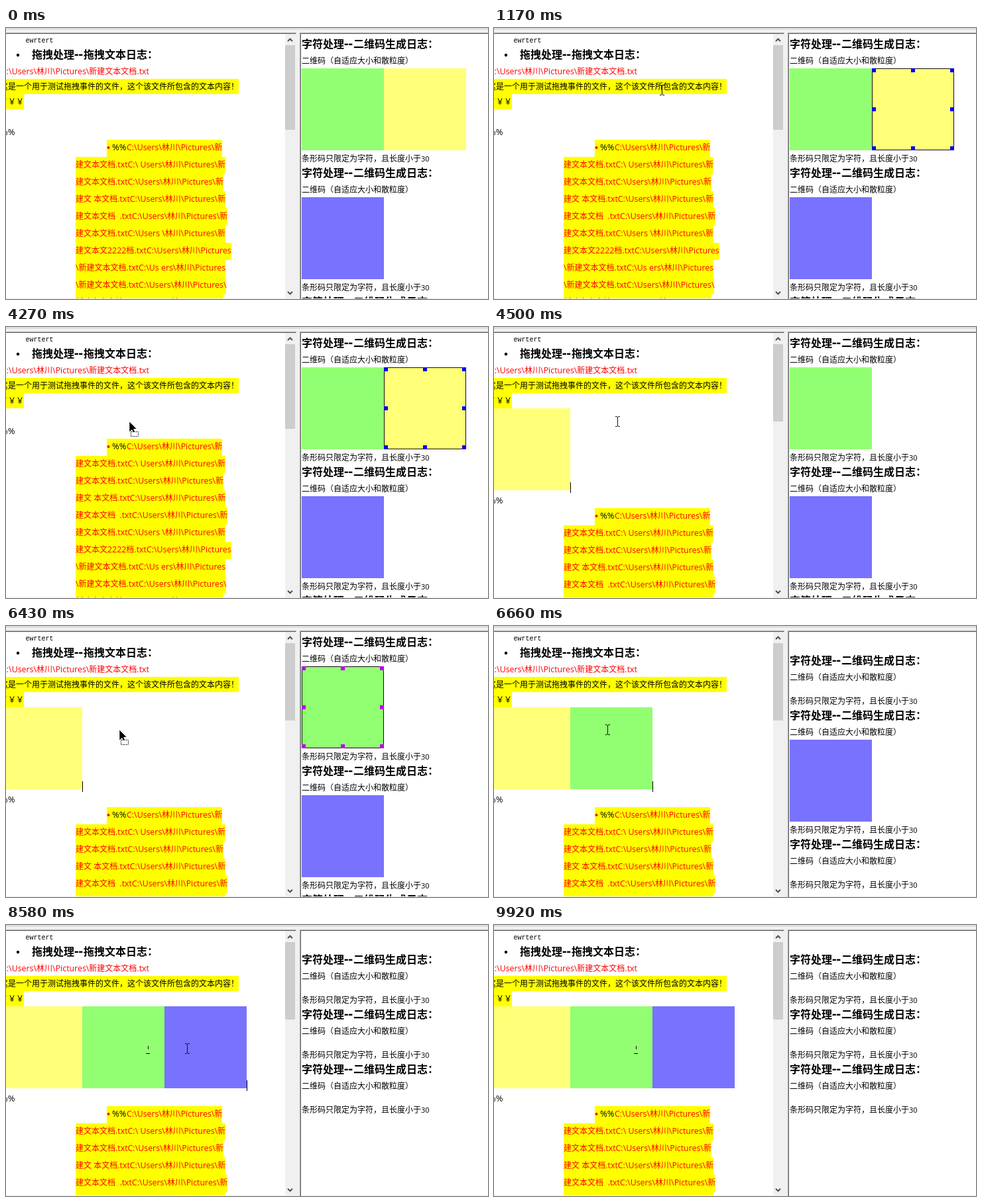
Animation, 727 px wide and 410 px high, one loop 9990 ms. Source, as an HTML page:

```html
<!DOCTYPE html>
<html lang="zh-CN">
<head>
<meta charset="utf-8">
<title>Drag and drop log</title>
<style>
html, body { margin: 0; width: 100%; height: 100%; overflow: hidden; background: #f0f0f0; }
svg { display: block; width: 727px; height: 410px; }
text { font-family: "Open Sans", "Noto Sans CJK SC", "Noto Sans CJK", sans-serif; white-space: pre; }
.mono { font: 10px "Liberation Mono", monospace; }
.crisp { shape-rendering: crispEdges; }
</style>
</head>
<body>
<svg viewBox="0 0 727 410">
  <defs>
    <clipPath id="clipL"><rect y="9" width="421" height="400"/></clipPath>
    <clipPath id="clipR"><rect x="445" y="9" width="282" height="400"/></clipPath>
  </defs>
  <g class="crisp">
    <rect width="727" height="410" fill="#f0f0f0"/>
    <rect y="1" width="727" height="1" fill="#c8c8c8"/>
    <rect y="9" width="437" height="400" fill="#fff"/>
    <rect y="7" width="438" height="1" fill="#a0a0a0"/>
    <rect y="8" width="437" height="1" fill="#696969"/>
    <rect x="445" y="9" width="282" height="400" fill="#fff"/>
    <path d="M443 410V7H727V8H444V410z" fill="#a0a0a0"/>
    <path d="M444 410V8H727V9H445V410z" fill="#696969"/>
    <rect x="421" y="9" width="16" height="400" fill="#f0f0f0"/>
    <rect id="thumb" x="421" y="26" width="15" height="128" fill="#cdcdcd"/>
  </g>
  <path d="M425 20l3.5-3.5l3.5 3.5M425 399l3.5 3.5l3.5-3.5" fill="none" stroke="#505050" stroke-width="2"/>
  <g id="left" clip-path="url(#clipL)"></g>
  <g id="right" clip-path="url(#clipR)"></g>
  <rect id="caret" class="crisp" y="235" width="1" height="16"/>
  <path id="trace" d="M214.5 183V188M211 194.5H217" stroke="#111"/>
  <path id="beam" d="M-3 -7.5H-1L.5 -6.5L2 -7.5H4M.5 -6.5V6.5M-3 7.5H-1L.5 6.5L2 7.5H4" fill="none" stroke="#111"/>
  <g id="drag">
    <path d="M0 0V16L4 12.5L6.5 18L9 17L6.5 11.5L11 11z" stroke="#fff" stroke-width=".6"/>
    <rect x="2.5" y="15.5" width="11" height="7" fill="#fff" stroke="#111" stroke-dasharray="1.5 1"/>
  </g>
</svg>
<script>
const LOOP = 9990, STEP = 77.5, SIZE = 124, LINE = 26;
const RED = '#f00', YELLOW = '#ff0';
const $ = id => document.getElementById(id);
const left = $('left'), right = $('right');

// Each picture is selected, dragged and dropped once (times in ms).
const pics = [
  { block: 0, col: 1, fill: '#ffff78', mark: '#0000e8', pick: 870, drag: 3650, drop: 4500 },
  { block: 0, col: 0, fill: '#92ff72', mark: '#b800e8', pick: 5500, drag: 6040, drop: 6660 },
  { block: 1, col: 0, fill: '#7872ff', mark: '#e8e800', pick: 7740, drag: 8120, drop: 8580 }
];
const [first, second] = pics;

// Pointer strokes: each curves from where the last one ended.
const strokes = [
  { at: 70, steps: 8, via: [645, 270], to: [624, 156] },
  { at: 790, steps: 18, via: [140, 40], to: [112, 140] },
  { at: 2400, steps: 13, via: [920, 148], to: [633, 129] },
  { at: 3650, steps: 9, via: [400, 180], to: [186, 143] },
  { at: 4810, steps: 12, via: [790, 650], to: [486, 143] },
  { at: 6040, steps: 6, via: [330, 175], to: [171, 157] },
  { at: 6810, steps: 13, via: [470, 375], to: [537, 250] },
  { at: 8120, steps: 4, via: [400, 205], to: [273, 187] },
  { at: 8750, steps: 6, via: [400, 290], to: [530, 410] }
];
strokes.forEach((s, i) => s.from = i ? strokes[i - 1].to : [650, 388]);
const GONE = 9200;

function add(parent, tag, attrs) {
  const el = document.createElementNS('http://www.w3.org/2000/svg', tag);
  for (const k in attrs) el.setAttribute(k, attrs[k]);
  parent.appendChild(el);
  return el;
}

// Latin runs are set at their own size next to the CJK text.
function write(parent, x, y, str, { size = 12, latin = 12.4, fill = '#000', weight = 400 } = {}) {
  const el = add(parent, 'text', { x, y, fill, 'font-weight': weight });
  for (const run of str.match(/[ -~]+|[^ -~]+/g)) {
    const isLatin = /[ -~]/.test(run[0]);
    add(el, 'tspan', { 'font-size': isLatin ? latin : size }).textContent = run;
  }
  return el;
}

function heading(parent, x, y, a, b) {
  const o = { size: 16, latin: 20, weight: 700 };
  write(parent, x, y, a + '--', o);
  write(parent, x + 78, y, b, o);
}

const box = (parent, x, y, width, height, fill) =>
  add(parent, 'rect', { x, y, width, height, fill, class: 'crisp' });

function handles(parent, x, y, fill) {
  const g = add(parent, 'g', { class: 'crisp' });
  add(g, 'rect', { x: x + .5, y: y + .5, width: SIZE - 1, height: SIZE - 1, fill: 'none', stroke: '#111' });
  const gap = (SIZE - 6) / 2;
  for (let i = 0; i < 9; i++)
    if (i !== 4) box(g, x + i % 3 * gap, y + Math.floor(i / 3) * gap, 6, 6, fill);
  return g;
}

const show = (el, on) => el.setAttribute('visibility', on ? 'visible' : 'hidden');
const move = (el, x, y) => el.setAttribute('transform', `translate(${x} ${y})`);

// Left pane
const DIR = 'C:\\Users\\林川\\Pictures', FILE = '新建文本文档.txt';
add(left, 'text', { x: 29.5, y: 22, class: 'mono' }).textContent = 'ewrtert';
add(left, 'circle', { cx: 18, cy: 41, r: 2.2 });
heading(left, 39, 46, '拖拽处理', '拖拽文本日志：');
write(left, -7, 70, DIR + '\\' + FILE, { fill: RED });
box(left, 0, 77, 351, 23, YELLOW);
box(left, 0, 100, 27, 23, YELLOW);
write(left, -9, 93, '这是一个用于测试拖拽事件的文件，这个该文件所包含的文本内容！');
write(left, -9, 116, '￥￥￥');
pics.forEach((p, i) => p.dropped = box(left, -9 + i * SIZE, 123, SIZE, SIZE, p.fill));

const body = add(left, 'g');
write(body, -8, 162, '%%', { latin: 13 });
const tail = '.txt' + DIR + '\\新';
const rows = [
  DIR + '\\新',
  '建文本文档' + tail.replace('\\U', '\\ U'),
  '建文本文档' + tail,
  '建文 本文档' + tail,
  '建文本文档  ' + tail,
  '建文本文档' + tail.replace('Users', 'Users '),
  '建文本文2222档.txt' + DIR,
  '\\' + FILE + DIR.replace('Us', 'Us '),
  '\\' + FILE + DIR + '\\',
  FILE + DIR + '\\'
];
rows.forEach((str, i) => {
  const x = i ? 105 : 152, y = 169 + i * LINE, start = i ? x : 182;
  const back = box(body, x, y, 0, LINE, YELLOW);
  const text = write(body, start, y + 16, str, { fill: RED });
  back.setAttribute('width', Math.round(start + text.getComputedTextLength() - x));
});
add(body, 'circle', { cx: 154.5, cy: 181, r: 2, fill: RED });
write(body, 160, 185, '%%', { latin: 13 });

// Right pane
const blocks = [0, 1, 2].map(i => {
  const g = add(right, 'g'), note = add(g, 'g');
  heading(g, 446, 6, '字符处理', '二维码生成日志：');
  write(g, 446, 30, '二维码（自适应大小和散粒度）');
  write(note, 446, 5, '条形码只限定为字符，且长度小于30', { latin: 11 });
  const own = pics.filter(p => p.block === i);
  for (const p of own) {
    const x = 446 + p.col * SIZE;
    p.tile = box(g, x, 37, SIZE, SIZE, p.fill);
    p.marks = handles(g, x, 37, p.mark);
  }
  return { g, note, own };
});

// Pointer position along a curve, slowing down, in even steps of time
function pointer(t) {
  const s = strokes.filter(s => s.at <= t).pop();
  if (!s || t >= GONE) return null;
  const last = s.steps - 1;
  const step = Math.min(last, Math.round((t - s.at) / STEP));
  const u = 1 - (1 - step / last) ** 2, v = 1 - u;
  return [0, 1].map(k => Math.round(v * v * s.from[k] + 2 * u * v * s.via[k] + u * u * s.to[k]));
}

function draw(t) {
  for (const p of pics) {
    show(p.dropped, t >= p.drop);
    show(p.tile, t < p.drop);
    show(p.marks, t >= p.pick && t < p.drop);
  }
  const pushed = t >= first.drop;
  move(body, 0, pushed ? 105 : 0);
  $('thumb').setAttribute('height', pushed ? 117 : 128);

  let y = t < second.drop ? 24 : 52;
  for (const { g, note, own } of blocks) {
    const extra = own.some(p => t < p.drop) ? 112 : 0;
    move(g, 0, y);
    move(note, 0, 61 + extra);
    y += 83 + extra;
  }

  const count = pics.filter(p => t >= p.drop).length;
  show($('caret'), count && (t + 1000) % 1060 < 320);
  $('caret').setAttribute('x', count * SIZE - 9);
  show($('trace'), t >= 6970);

  const pos = pointer(t), dragging = pics.some(p => t >= p.drag && t < p.drop);
  show($('beam'), pos && !dragging);
  show($('drag'), pos && dragging);
  if (pos) move($(dragging ? 'drag' : 'beam'), ...pos);
}

function tick(now) {
  draw(now % LOOP);
  requestAnimationFrame(tick);
}
draw(0);
requestAnimationFrame(tick);
</script>
</body>
</html>
```
